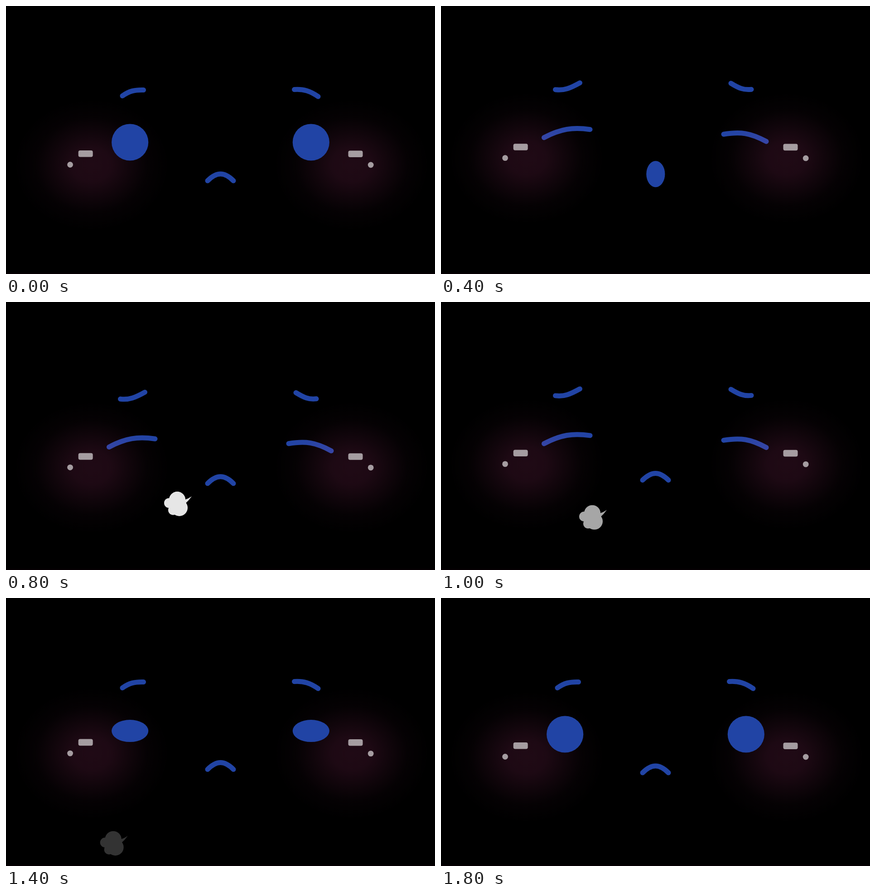
Recreate the animation shown at these times as an HTML page. Size 947 px wide and 592 px high, loop 2 s.

```html
<!DOCTYPE html>
<html lang="en">
<head>
<meta charset="utf-8">
<title>Sighing face</title>
<style>
  html, body { margin: 0; width: 100%; height: 100%; overflow: hidden; background: #000; }
  svg { display: block; width: 947px; height: 592px; }
  .line { fill: none; stroke: #2144a5; stroke-width: 11; stroke-linecap: round; }
  .solid { fill: #2144a5; }
  .mark { fill: #a59da1; }
</style>
</head>
<body>
<svg viewBox="0 0 947 592">
  <defs>
    <radialGradient id="blush">
      <stop offset="0" stop-color="#ff50aa" stop-opacity=".125"/>
      <stop offset=".25" stop-color="#ff50aa" stop-opacity=".115"/>
      <stop offset=".5" stop-color="#ff50aa" stop-opacity=".063"/>
      <stop offset=".72" stop-color="#ff50aa" stop-opacity=".02"/>
      <stop offset="1" stop-color="#ff50aa" stop-opacity="0"/>
    </radialGradient>
  </defs>
  <rect y="589" width="947" height="3" fill="#060003"/>
  <path id="brows" class="line"/>
  <g id="face">
    <path id="lids" class="line"/>
    <g fill="url(#blush)">
      <ellipse cx="189" cy="351" rx="172" ry="146"/>
      <ellipse cx="763" cy="351" rx="172" ry="146"/>
    </g>
    <g id="eyes" class="solid">
      <ellipse cx="273.7" cy="301" rx="40.6"/>
      <ellipse cx="673.3" cy="301" rx="40.6"/>
    </g>
    <g class="mark">
      <rect x="159.7" y="319" width="32" height="14.6" rx="4"/>
      <rect x="755.5" y="319.4" width="32" height="14.6" rx="4"/>
      <circle cx="141.6" cy="350.5" r="6.4"/>
      <circle cx="805.2" cy="351" r="6.4"/>
    </g>
    <path id="frown" class="line" d="M445 386C465 366 482 366 502 386"/>
    <ellipse id="mouth" class="solid" cx="473.8"/>
  </g>
  <g id="puff" fill="#fff">
    <circle cx="378" cy="437" r="18.2"/>
    <circle cx="382.6" cy="454.5" r="18.4"/>
    <circle cx="359.8" cy="444" r="10.8"/>
    <circle cx="368.8" cy="459.6" r="10.8"/>
    <path d="M394 437Q402 435 410 429.3Q404 438 396 445z"/>
  </g>
</svg>
<script>
const STEP = 200;
const BROWS = {
  raised: "M257 198.5C272 188 283 185 303.5 185.5M636.5 184.5C657 183 672 188 689 200",
  knit: "M252.5 199.5C272 202 286 196 306.5 184.5M640 185.5C657 196 668 201 685 199"
};
const LIDS = {
  down: "M227.5 302.8C265 309 294 305 329 285.2M626 285.5C660 303 683 307 719.5 301.8",
  up: "M227.5 305.5C264 286 291 282 329 287.5M624 298C661 292 683 295 718 314"
};
// y: head offset, eye: open eye height, mouth: [centre, height], puff: [dx, opacity]
const poses = [
  { y: 0, eye: 40.6 },
  { y: 7.4, lids: "down" },
  { y: -14.8, lids: "up", mouth: [386, 29] },
  { y: 0, lids: "up", mouth: [381.5, 24.7] },
  { y: 14.8, lids: "up", puff: [0, .9] },
  { y: 7.4, lids: "up", puff: [-44, .65] },
  { y: 0, lids: "up", puff: [-112.3, .4] },
  { y: -7.4, eye: 24.5, puff: [-141.3, .2] },
  { y: -7.4, eye: 36.5, puff: [-188, .1] },
  { y: 0, eye: 40.6 }
];

const el = id => document.getElementById(id);
const show = (id, on) => el(id).setAttribute("visibility", on ? "visible" : "hidden");
const move = (id, x, y) => el(id).setAttribute("transform", `translate(${x} ${y})`);

function draw({ y, eye, lids, mouth, puff }) {
  move("face", 0, y);
  move("brows", 0, lids ? y : 0);
  el("brows").setAttribute("d", lids ? BROWS.knit : BROWS.raised);
  show("lids", lids);
  if (lids) el("lids").setAttribute("d", LIDS[lids]);
  show("eyes", eye);
  if (eye) for (const e of el("eyes").children) e.setAttribute("ry", eye);
  show("frown", !mouth);
  show("mouth", mouth);
  if (mouth) {
    const [cy, ry] = mouth;
    el("mouth").setAttribute("cy", cy);
    el("mouth").setAttribute("ry", ry);
    el("mouth").setAttribute("rx", ry * .71);
  }
  show("puff", puff);
  if (puff) {
    const [dx, opacity] = puff;
    move("puff", dx, dx * -.68);
    el("puff").setAttribute("opacity", opacity);
  }
}

function tick() {
  draw(poses[Math.floor(performance.now() / STEP) % poses.length]);
  requestAnimationFrame(tick);
}
tick();
</script>
</body>
</html>
```
